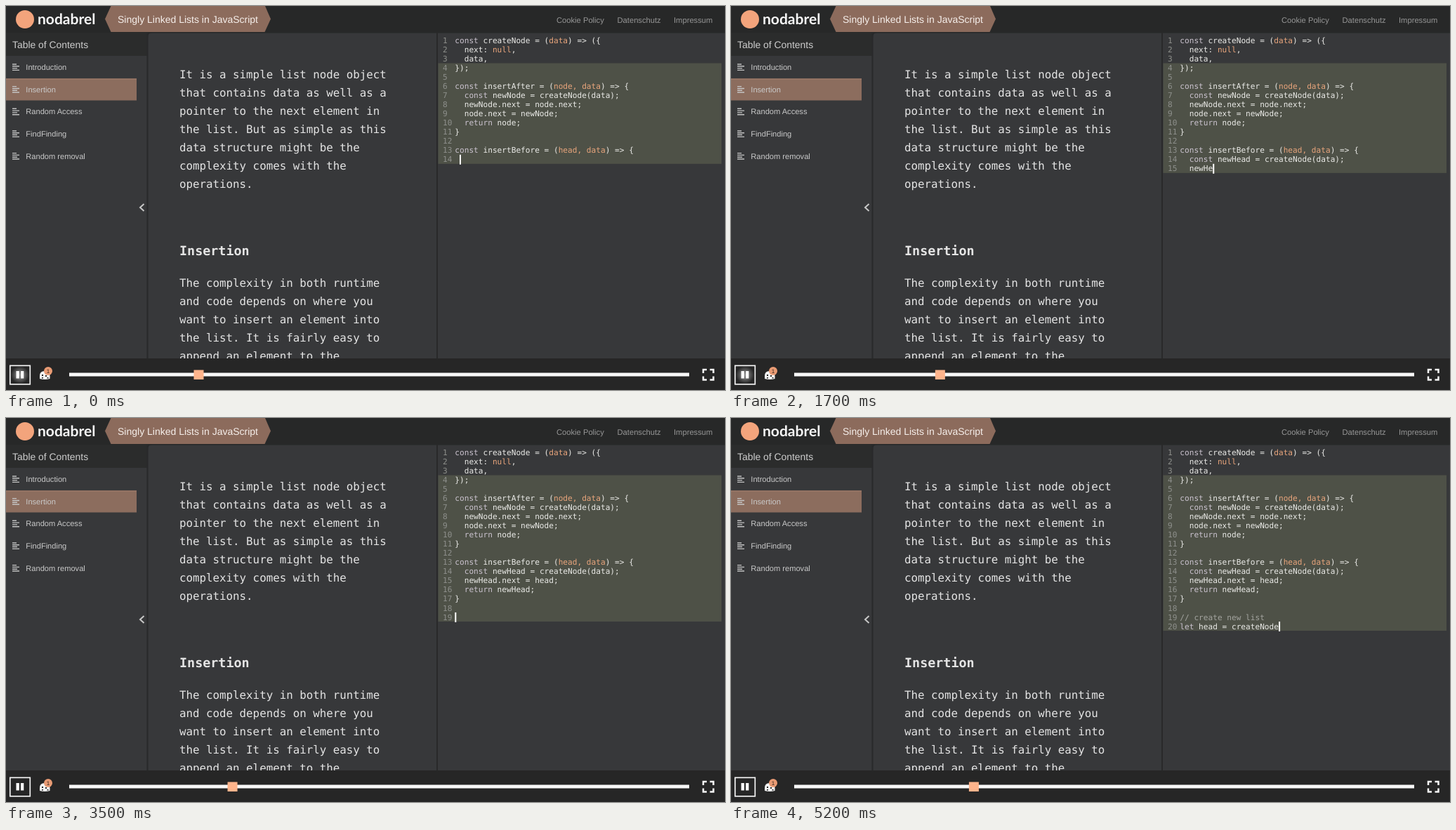
Recreate the animation shown at these times as an HTML page. Size 1024 by 547 pixels, loop 5.3 s.

```html
<!DOCTYPE html>
<html lang="en">
<head>
<meta charset="utf-8">
<title>Singly Linked Lists in JavaScript</title>
<style>
  html, body { margin: 0; width: 100%; height: 100%; overflow: hidden; background: #37383a; }
  svg { display: block; width: 100%; height: 100%; }
  text { white-space: pre; text-rendering: geometricPrecision; }
  .ui { font-family: "Liberation Sans", Arial, sans-serif; }
  .title { font-size: 14px; fill: #f6efeb; }
  .toc { font-size: 11.1px; fill: #c9c9c9; }
  .links { font-size: 11.2px; fill: #969696; }
  .brand { font: 700 21px Lato, sans-serif; fill: #f7f7f7; }
  .prose { font: 15.8px "DejaVu Sans Mono", monospace; fill: #e4e4e4; }
  .prose .head { font-size: 18.4px; font-weight: 700; }
  .code { font: 11.14px "DejaVu Sans Mono", monospace; fill: #ebebe8; }
  .num { fill: #8e908c; }
  .key { fill: #cbc3cf; }
  .arg { fill: #e9a57c; }
  .note { fill: #a3a49f; }
  .badge { font-size: 8px; fill: #33251d; text-anchor: middle; }
</style>
</head>
<body>
<svg viewBox="0 0 1024 547" preserveAspectRatio="none">
  <defs>
    <radialGradient id="halo">
      <stop offset="0" stop-color="#8c8c8c"/>
      <stop offset=".5" stop-color="#626262"/>
      <stop offset="1" stop-color="#262626"/>
    </radialGradient>
    <clipPath id="page"><path d="M202 39H613V502H202z"/></clipPath>
  </defs>

  <!-- panels -->
  <path fill="#37383a" d="M0 0H1024V547H0z"/>
  <path fill="#272828" d="M0 0H1024V38.5H0z"/>
  <path fill="#2b2c2c" d="M0 38H201V71H0z"/>
  <path fill="#29292a" d="M200.5 38H202.5V502H200.5zM613 38H615V502H613z"/>
  <path fill="#272828" d="M202 38H208Q202 38 202 45z"/>

  <!-- header -->
  <circle cx="27" cy="19" r="13" fill="#f3a47c"/>
  <text class="brand" x="45" y="26">nodabrel</text>
  <path fill="#8c6b5c" d="M149.500 0H369L377 18.500L368.500 37H149.500L141 18.500z"/>
  <g class="ui">
    <text class="title" x="159" y="23.500">Singly Linked Lists in JavaScript</text>
    <g class="links">
      <text x="784" y="23.500">Cookie Policy</text>
      <text x="870.500" y="23.500">Datenschutz</text>
      <text x="951" y="23.500">Impressum</text>
    </g>
    <text x="9" y="60" font-size="13.900" fill="#cdcdcd">Table of Contents</text>
  </g>

  <!-- contents -->
  <path fill="#8c6d5e" d="M0 103.500H186V134.500H0z"/>
  <path fill="#a9826e" d="M0 103.500H186V104.500H0z"/>
  <g id="toc" class="ui toc"></g>
  <path d="M196.500 282L191 287L196.500 292" fill="none" stroke="#c8c8c8" stroke-width="2"/>

  <g id="prose" class="prose" clip-path="url(#page)"></g>

  <!-- editor -->
  <rect id="mark" x="615.500" width="403.500" fill="#4e5147"/>
  <g id="code" class="code"></g>
  <rect id="caret" width="2" height="14" fill="#fff"/>

  <!-- player -->
  <path fill="#262626" d="M0 502H1024V547H0z"/>
  <rect id="glow" x="7" y="513" width="26" height="25" fill="url(#halo)"/>
  <rect x="5.800" y="512.300" width="28.500" height="26.500" fill="none" stroke="#f2f2f2" stroke-width="1.700"/>
  <path fill="#fff" d="M14.500 520H18.800V530.500H14.500zM21 520H25.300V530.500H21z"/>
  <path fill="#f4f4f4" d="M48 531V527Q48 520 55 520Q62.500 520 62.500 527V531Q55 533 48 531z"/>
  <path fill="#262626" d="M51 525h2v2h-2zM56 526h2v2h-2zM51 529h2v1.500h-2zM58.500 529h2v1.500h-2z"/>
  <circle cx="60" cy="520" r="6" fill="#e99b74"/>
  <text class="ui badge" x="60" y="523">1</text>
  <path fill="#f8f8f8" d="M90 522.500H973V527.500H90z"/>
  <rect id="knob" y="518.500" width="14" height="13.500" fill="#ffb48c"/>
  <path fill="none" stroke="#f6f6f6" stroke-width="2.500"
    d="M993 523V518H998M1002.500 518H1007.500V523M1007.500 527.500V532.500H1002.500M998 532.500H993V527.500"/>
</svg>
<script>
  const LOOP = 5300, STEP = 100;
  const CODE_X = 639.3, CHAR = 6.705, TOP = 42.4, ROW = 13.03;
  const $ = id => document.getElementById(id);
  const text = (x, y, str, cls = "") => `<text class="${cls}" x="${x}" y="${y}">${str}</text>`;

  const given = `const createNode = (data) => ({
  next: null,
  data,
});

const insertAfter = (node, data) => {
  const newNode = createNode(data);
  newNode.next = node.next;
  node.next = newNode;
  return node;
}

const insertBefore = (head, data) => {
`;
  const typed = `  const newHead = createNode(data);
  newHead.next = head;
  return newHead;
}

// create new list
let head = createNode`;

  // [ms, characters typed]
  const pace = [[0, 1], [1300, 35], [2200, 53], [2900, 68], [3500, 80], [4500, 99], [5200, 120]];

  function typedCount(t) {
    const i = Math.max(1, pace.findIndex(p => p[0] >= t));
    const [t0, n0] = pace[i - 1], [t1, n1] = pace[i];
    return Math.round(n0 + (n1 - n0) * (t - t0) / (t1 - t0));
  }

  function paint(line) {
    const span = cls => `<tspan class="${cls}">$1</tspan>`;
    if (line.startsWith("//")) return line.replace(/(.*)/s, span("note"));
    return line
      .replace(/\b(const|return|let)\b/, span("key"))
      .replace(/(null)/, span("arg"))
      .replace(/\(([^()]*)\)(?= =>)/, `(${span("arg")})`);
  }

  function drawStatic() {
    const items = ["Introduction", "Insertion", "Random Access", "FindFinding", "Random removal"];
    $("toc").innerHTML = items.map((name, i) => {
      const y = 87 + 31.65 * i;
      const bars = [6, 10, 7, 10].map((w, k) => `M9 ${y - 4 + 2.8 * k}h${w}`).join("");
      return `<path d="${bars}" stroke="#c4c4c4" stroke-width="1.4"/>` + text(28.3, y + 4, name);
    }).join("");

    const block = (y, lines) => lines.map((s, i) => text(247, y + 26.02 * i, s)).join("");
    $("prose").innerHTML = block(102.5, [
      "It is a simple list node object",
      "that contains data as well as a",
      "pointer to the next element in",
      "the list. But as simple as this",
      "data structure might be the",
      "complexity comes with the",
      "operations."
    ]) + text(247, 355.3, "Insertion", "head") + block(400, [
      "The complexity in both runtime",
      "and code depends on where you",
      "want to insert an element into",
      "the list. It is fairly easy to",
      "append an element to the"
    ]);
  }

  function draw(t) {
    const lines = (given + typed.slice(0, typedCount(t))).split("\n");
    const last = lines.length - 1;
    $("code").innerHTML = lines.map((line, i) => {
      const y = TOP + ROW * i + 10.6;
      return text(622, y, i + 1, "num") + text(CODE_X, y, paint(line));
    }).join("");

    const markTop = TOP + ROW * 3;
    $("mark").setAttribute("y", markTop);
    $("mark").setAttribute("height", TOP + ROW * (last + 1) - markTop);
    $("caret").setAttribute("x", CODE_X + CHAR * lines[last].length);
    $("caret").setAttribute("y", TOP + ROW * last);
    $("knob").setAttribute("x", 267.5 + 0.01373 * t);
    $("glow").setAttribute("opacity", Math.min(1, Math.max(0, (3400 - t) / 400)));
  }

  drawStatic();
  const start = performance.now();
  let shown = -1;
  function tick() {
    const t = Math.floor((performance.now() - start) % LOOP / STEP) * STEP;
    if (t !== shown) draw(shown = t);
    requestAnimationFrame(tick);
  }
  tick();
</script>
</body>
</html>
```
